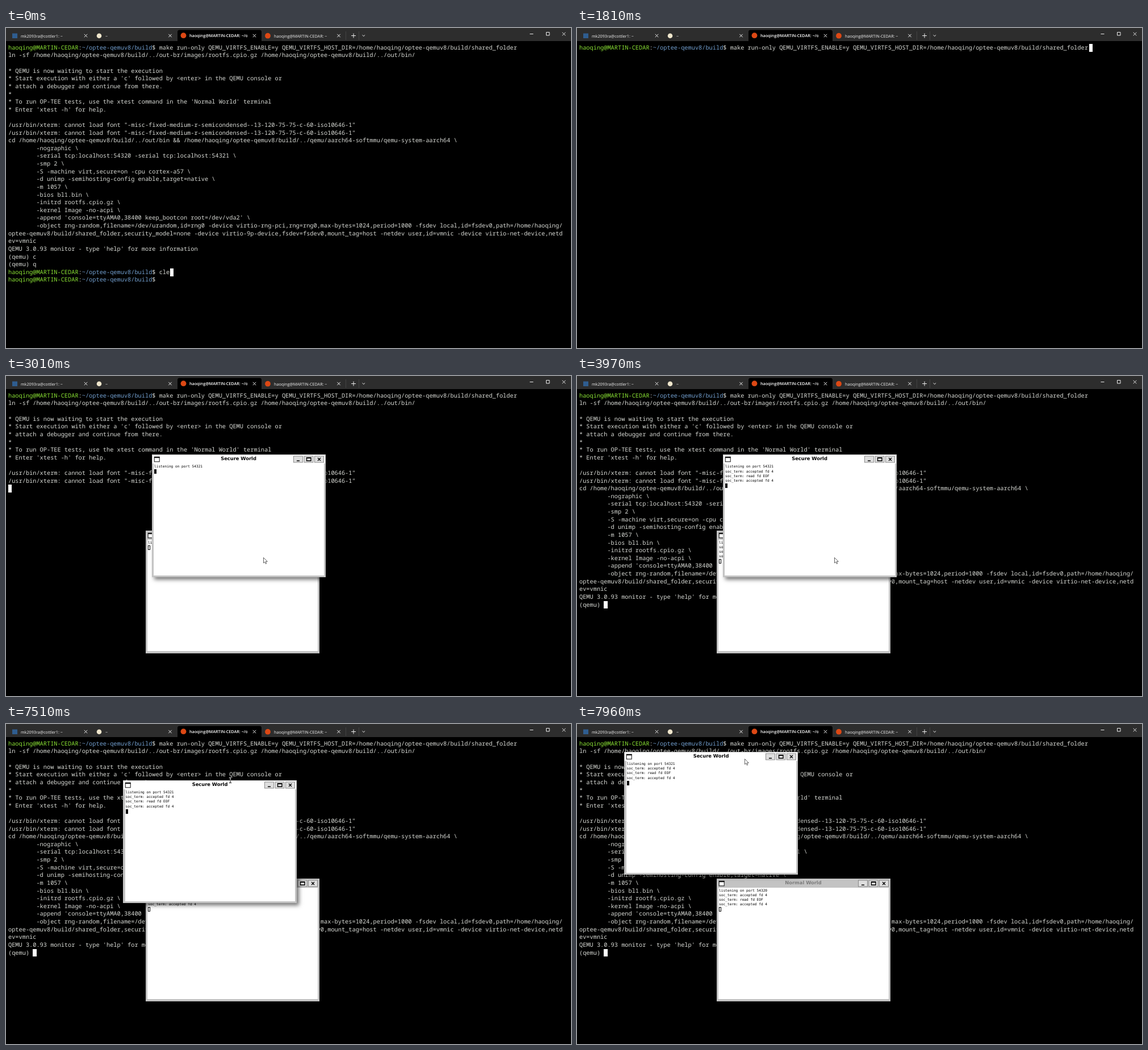
An HTML page that plays this animation: 995x563 px, repeating every 8 s.

```html
<!DOCTYPE html>
<html lang="en">
<head>
<meta charset="utf-8">
<title>Terminal session</title>
<style>
  html, body { margin: 0; width: 100%; height: 100%; overflow: hidden; background: #000; }
  #stage { position: relative; width: 995px; height: 563px; overflow: hidden; background: #000; text-rendering: geometricPrecision; }
  #stage * { box-sizing: border-box; }
  #bar, #mouse svg { position: absolute; left: 0; top: 0; overflow: visible; }
  #bar text { font: 7.2px "Open Sans", "Noto Sans", sans-serif; fill: #f2f2f2; }
  #bar .on { font-weight: 600; fill: #fff; }
  .row { position: absolute; left: 4px; height: 13.62px; white-space: pre; color: #d8dad5;
         font: 500 10.317px/13.62px "Noto Sans Mono", "DejaVu Sans Mono", monospace; }
  .row b { font-weight: 500; color: #8ae234; }
  .row i { font-style: normal; color: #729fcf; }
  #caret { position: absolute; width: 6.2px; height: 13.6px; background: #fff; }
  .win { position: absolute; width: 306px; height: 216px; background: #c3c3c3; }
  .win h1 { position: absolute; inset: 0 0 auto; margin: 0; height: 16px; text-align: center;
            font: bold 8.33px/15.6px "DejaVu Sans", sans-serif; color: #7c7c7c; }
  .win.active { box-shadow: 4px 4px 7px rgba(0, 0, 0, .55); }
  .win.active h1 { color: #000; background: #fff; left: 1px; right: 1px; top: 1px; line-height: 13.6px; height: 15px; }
  .win svg { position: absolute; left: 0; top: 0; }
  .page { position: absolute; left: 3.5px; right: 3px; top: 16px; bottom: 3.5px; background: #fff; }
  .page pre { position: absolute; left: 1px; top: 2.1px; margin: 0; color: #000;
              font: 6.15px/8.15px "DejaVu Sans Mono", monospace; }
  .page div { position: absolute; left: 1.2px; width: 4px; height: 8px; border: 1px solid #000; }
  .active .page div { background: #000; }
  #mouse { position: absolute; width: 0; height: 0; }
  #mouse.beam { mix-blend-mode: difference; }
  #mouse.beam .arrow, #mouse.arrow .beam { display: none; }
</style>
</head>
<body>
<div id="stage">
  <svg id="bar" width="995" height="23"></svg>
  <div id="term"></div>
  <div id="caret"></div>
  <div id="normal" class="win"></div>
  <div id="secure" class="win active"></div>
  <div id="mouse">
    <svg class="arrow" width="9" height="13"><path d="M.5 .5V10L2.7 8L4.3 11.5L5.8 10.8L4.3 7.4H7.3Z" fill="#fff" stroke="#222" stroke-width=".7"/></svg>
    <svg class="beam" width="6" height="11"><path d="M-2.2-4.6H-.6L0-4.2L.6-4.6H2.2M0-4.2V4.2M-2.2 4.6H-.6L0 4.2L.6 4.6H2.2" fill="none" stroke="#fff"/></svg>
  </div>
</div>
<script>
const LOOP = 8000, COLS = 158, CELL_W = 6.19, CELL_H = 13.62, LEFT = 4, TOP = 28, TEXT_TOP = 28.8;
const user = 'haoqing', host = 'MARTIN-CEDAR';
const build = `/home/${user}/optee-qemuv8/build`;
const $ = id => document.getElementById(id);
const escapeHtml = s => s.replace(/&/g, '&amp;').replace(/</g, '&lt;');

// Terminal text
const promptText = `${user}@${host}:~/optee-qemuv8/build$ `;
const promptHtml = `<b>${user}@${host}</b>:<i>~/optee-qemuv8/build</i>$ `;
const PROMPT_COLS = promptText.length;
const command = `make run-only QEMU_VIRTFS_ENABLE=y QEMU_VIRTFS_HOST_DIR=${build}/shared_folder`;
const fontError = '/usr/bin/xterm: cannot load font "-misc-fixed-medium-r-semicondensed--13-120-75-75-c-60-iso10646-1"';
const options = [
  '-nographic', '-serial tcp:localhost:54320 -serial tcp:localhost:54321', '-smp 2',
  '-S -machine virt,secure=on -cpu cortex-a57',
  '-d unimp -semihosting-config enable,target=native', '-m 1057', '-bios bl1.bin',
  '-initrd rootfs.cpio.gz', '-kernel Image -no-acpi',
  "-append 'console=ttyAMA0,38400 keep_bootcon root=/dev/vda2'"
].map(s => ' '.repeat(8) + s + ' \\');
const device = ' '.repeat(8) + '-object rng-random,filename=/dev/urandom,id=rng0 -device virtio-rng-pci,rng=rng0,' +
  `max-bytes=1024,period=1000 -fsdev local,id=fsdev0,path=${build}/shared_folder,security_model=none ` +
  '-device virtio-9p-device,fsdev=fsdev0,mount_tag=host -netdev user,id=vmnic -device virtio-net-device,netdev=vmnic';
const wrap = s => s.match(new RegExp(`.{1,${COLS}}`, 'g'));

const intro = [
  '$' + command,
  `ln -sf ${build}/../out-br/images/rootfs.cpio.gz ${build}/../out/bin/`,
  '',
  '* QEMU is now waiting to start the execution',
  "* Start execution with either a 'c' followed by <enter> in the QEMU console or",
  '* attach a debugger and continue from there.',
  '*',
  "* To run OP-TEE tests, use the xtest command in the 'Normal World' terminal",
  "* Enter 'xtest -h' for help.",
  ''
];
const warned = [...intro, fontError, fontError];
const booted = [
  ...warned,
  `cd ${build}/../out/bin && ${build}/../qemu/aarch64-softmmu/qemu-system-aarch64 \\`,
  ...options, ...wrap(device),
  "QEMU 3.0.93 monitor - type 'help' for more information"
];
const past = typed => [...booted, '(qemu) c', '(qemu) q', '$' + typed, '$'];
const typing = typed => ({ lines: past(typed), caret: [29, PROMPT_COLS + typed.length] });
const fresh = typed => ({ lines: ['$' + typed], caret: [0, PROMPT_COLS + typed.length] });

const mouse = (x, y, kind = 'arrow') => ({ mouse: [x, y, kind] });
const beam = (x, y) => mouse(x, y, 'beam');
const drag = (x, y, mx, my, kind) => ({ secure: [x, y], ...mouse(mx, my, kind) });

// Each step overrides part of the state from its time on.
const steps = [
  [0, { ...typing('cle'), mouse: null, secure: [256.5, 138.4], log: 0 }],
  [280, typing('clea')],
  [430, typing('clear')],
  [580, { lines: ['', ...past('clear').slice(1)], caret: [0, 0] }],
  [730, fresh('')],
  [1410, fresh('clear')],
  [1810, fresh(command)],
  [2770, { lines: intro, caret: [10, 0] }],
  [2890, { lines: warned, caret: [12, 0], ...mouse(452.5, 319) }],
  [3010, { log: 1 }],
  [3820, { log: 3 }],
  [3970, { log: 4, lines: [...booted, '(qemu) '], caret: [27, 7] }],
  [4940, beam(328.5, 318.5)],
  [5090, beam(331.5, 305.5)],
  [6580, beam(514.5, 214)],
  [6700, beam(492.5, 192)],
  [6850, beam(480, 172)],
  [6970, mouse(473, 154)],
  [7120, mouse(470, 152.5)],
  [7240, mouse(468, 151)],
  [7390, drag(246, 130.5, 446, 137)],
  [7510, drag(206, 99, 395, 99, 'beam')],
  [7660, drag(120, 65, 326, 74)],
  [7810, drag(95.5, 54, 304, 65)],
  [7960, drag(83, 49, 295, 61)]
];

// Tab bar
const cross = (x, y, r) => `M${x - r} ${y - r}l${2 * r} ${2 * r}m0 ${-2 * r}l${-2 * r} ${2 * r}`;
const tabTitle = `${user}@${host}: ~`;
$('bar').innerHTML = `
  <rect width="995" height="23" fill="#2d2d2d"/>
  <path d="M302 23V7Q302 3.5 305.5 3.5H446.5Q450 3.5 450 7V23Z" fill="#000"/>
  <path d="M598.5 6V21M621.5 6V21" stroke="#444"/>
  <rect x="11" y="9.5" width="9" height="8.5" fill="#2f5d8f"/>
  <circle cx="164" cy="13.8" r="4.3" fill="#efe6cc"/>
  <circle cx="312.5" cy="13.2" r="4.9" fill="#dd4814"/>
  <circle cx="461" cy="13.7" r="4.9" fill="#dd4814"/>
  <text x="26" y="16.5">mk2093ra@cottler1: ~</text>
  <text x="175" y="16.5">~</text>
  <svg x="323" y="0" width="102.5" height="23"><text class="on" x="0" y="16">${tabTitle}/optee-qemuv8/build</text></svg>
  <text x="472" y="16.5">${tabTitle}</text>
  <path fill="none" stroke="#eee" d="${[140.5, 289, 437.5, 586].map(x => cross(x, 13.5, 2.7)).join('')}
    M608 13.5h8m-4-4v8M627.5 12.3l2.3 2.2l2.3-2.2M922.5 10.5h6M951.5 7.5h5.5v5.5h-5.5z${cross(982.5, 10.5, 2.8)}"/>`;

// Pop-up windows
function fillWindow(id, title) {
  const button = x => `<rect x="${x}" y="3" width="16" height="11" fill="#dedede" stroke="#777" stroke-width=".8"/>`;
  $(id).innerHTML = `<h1>${title}</h1>
    <svg width="306" height="16">
      <rect x="4.2" y="4.3" width="9" height="8.5" fill="#fff" stroke="#111"/><path d="M4 5.2h9.5" stroke="#111" stroke-width="2"/>
      ${[249.5, 268, 286.5].map(button).join('')}
      <path fill="none" stroke="#000" stroke-width="1.4" d="M255 11.3h5M272.5 5.8h7.5v5.5h-7.5zM272.5 6.3h7.5${cross(294.5, 8.5, 2.5)}"/>
    </svg>
    <div class="page"><pre></pre><div></div></div>`;
}
fillWindow('secure', 'Secure World');
fillWindow('normal', 'Normal World');

const place = (el, x, y) => { el.style.left = x + 'px'; el.style.top = y + 'px'; };

function writeLog(id, port, count) {
  const log = [`listening on port ${port}`, 'soc_term: accepted fd 4', 'soc_term: read fd EOF', 'soc_term: accepted fd 4'];
  const win = $(id);
  win.style.display = count ? '' : 'none';
  win.querySelector('pre').textContent = log.slice(0, count).join('\n');
  win.querySelector('.page div').style.top = 1.9 + count * 8.15 + 'px';
}

function draw(s) {
  $('term').innerHTML = s.lines.map((line, i) => {
    const html = line[0] === '$' ? promptHtml + escapeHtml(line.slice(1)) : escapeHtml(line);
    return `<div class="row" style="top:${(TEXT_TOP + i * CELL_H).toFixed(2)}px">${html}</div>`;
  }).join('');
  place($('caret'), LEFT + s.caret[1] * CELL_W, TOP + s.caret[0] * CELL_H);
  writeLog('secure', 54321, s.log);
  writeLog('normal', 54320, s.log);
  place($('secure'), ...s.secure);
  place($('normal'), 245.5, 271.5);
  const pointer = $('mouse');
  pointer.style.display = s.mouse ? '' : 'none';
  if (s.mouse) {
    place(pointer, s.mouse[0], s.mouse[1]);
    pointer.className = s.mouse[2];
  }
}

let shown = 0;
function tick() {
  const t = performance.now() % LOOP;
  const count = steps.filter(([at]) => at <= t).length;
  if (count !== shown) {
    shown = count;
    draw(Object.assign({}, ...steps.slice(0, count).map(step => step[1])));
  }
  requestAnimationFrame(tick);
}
tick();
</script>
</body>
</html>
```
